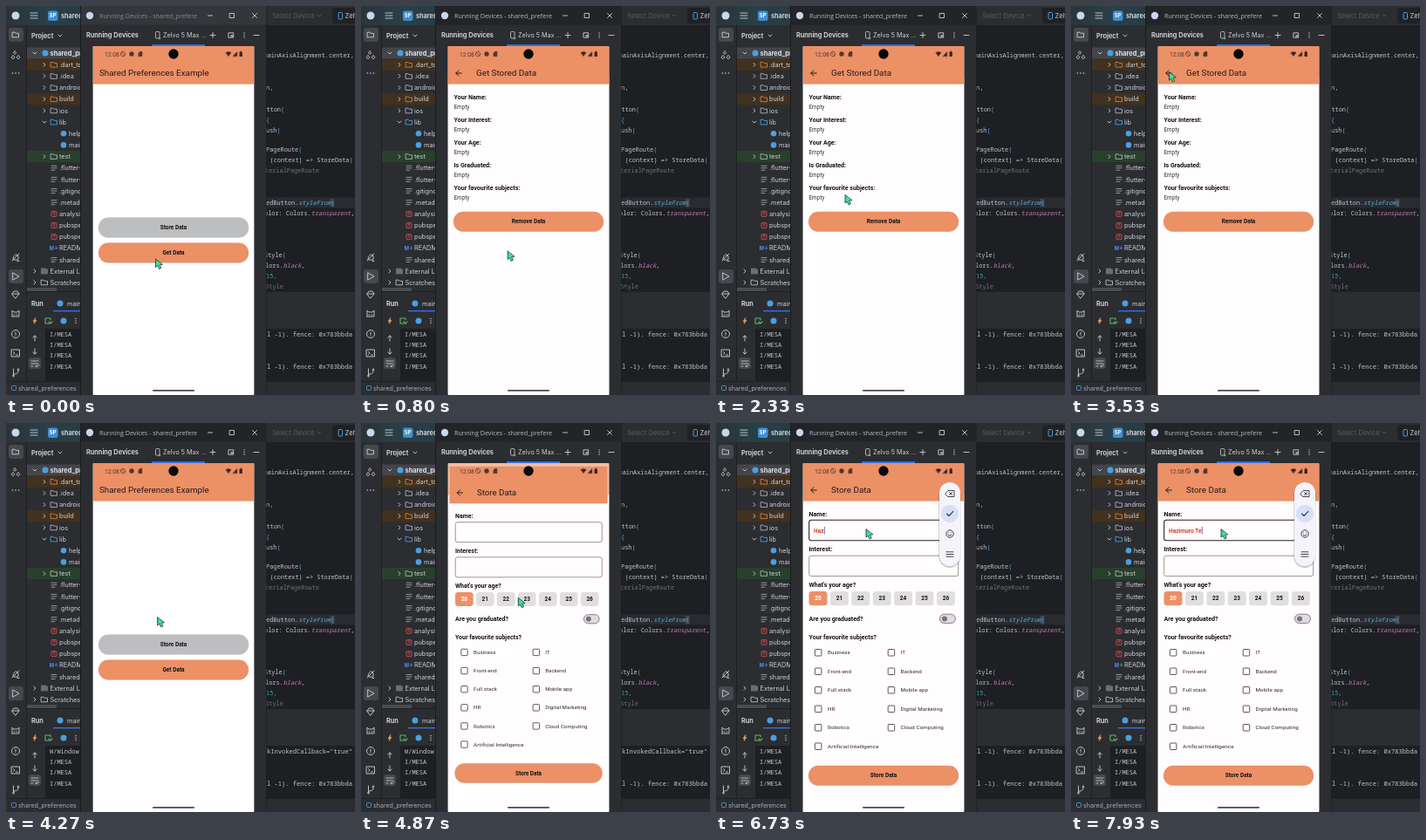
An HTML page for the animation above (8 s loop, 400 by 446 pixels).

```html
<!DOCTYPE html>
<html lang="en">
<head>
<meta charset="utf-8">
<title>Shared Preferences Example</title>
<style>
  html, body { margin: 0; width: 100%; height: 100%; overflow: hidden; background: #1e1f22; }
  svg { display: block; width: 100%; height: 100%; }
  text { white-space: pre; }
</style>
</head>
<body>
<svg id="stage" viewBox="0 0 400 446"></svg>
<script>
const UI = 'Inter, sans-serif', APP = 'Roboto, sans-serif', MONO = 'Noto Sans Mono, monospace';
const ORANGE = '#ec9066', PANEL = '#2b2d30', EDITOR = '#1e1f22', GREY = '#ced0d6', BLUE = '#4a9fe0';
const TYPED = 'Hazimuro Te';

// ---- markup helpers; text is placed by its vertical centre ----
const text = (x, y, str, size, fill, font = UI, more = '') =>
  `<text x="${x}" y="${y + size * 0.36}" font-size="${size}" fill="${fill}" font-family="${font}" ${more}>${str}</text>`;
const rect = (x, y, w, h, fill, r = 0, more = '') =>
  `<rect x="${x}" y="${y}" width="${w}" height="${h}" rx="${r}" fill="${fill}" ${more}/>`;
const dot = (x, y, r, fill, more = '') => `<circle cx="${x}" cy="${y}" r="${r}" fill="${fill}" ${more}/>`;
const line = (x, y, d, color = GREY, width = 0.9, fill = 'none') =>
  `<path transform="translate(${x} ${y})" d="${d}" fill="${fill}" stroke="${color}" stroke-width="${width}" stroke-linecap="round" stroke-linejoin="round"/>`;
const bold = 'font-weight="700"', semi = 'font-weight="600"', middle = 'text-anchor="middle"';
const RIGHT = 'M-1-2L1 0L-1 2', DOWN = 'M-2-1L0 1L2-1';
const FOLDER = 'M-3.5-2.8H-1L.2-1.7H3.5V2.8H-3.5Z';

// ---- IDE ----
function toolStrip() {
  const icons = [
    [55, 'M-3 2a1.7 1.7 0 1 0 .1 0M3 2a1.7 1.7 0 1 0 .1 0M-1-3a1.5 1.5 0 1 0 .1 0'],
    [288, 'M-4 4L4-4M-3 2C-2-4 2-4 3-1V3H-2M2 4.5H4'],
    [331, 'M-4-1L-2-4H2L4-1L0 4ZM-4-1H4'],
    [353, 'M-4 3V-4L-2-2H2L4-4V3H-4M-2 1H-1M1 1H2'],
    [376, 'M0-4.5a4.5 4.5 0 1 0 .1 0M0-2V.8M0 2.3V2.4'],
    [398, 'M-4.5-4H4.5V4H-4.5ZM-2.5-1.5L-1 0L-2.5 1.5M.5 2H2.5'],
    [420, 'M-2.5-4V4M-2.5 2C3 2 3 0 3-2M3-4a1 1 0 1 0 .1 0M-2.5 3a1 1 0 1 0 .1 0']
  ];
  return rect(0, 22, 24, 410, PANEL) + rect(3, 25, 17, 16, '#45484d', 3) + line(11, 33, FOLDER) +
    icons.map(([y, d]) => line(11, y, d)).join('') +
    rect(3, 302, 17, 16, '#45484d', 3) + line(11, 310, 'M-3-4L4 0L-3 4Z') +
    [7.5, 11, 14.5].map(x => dot(x, 77, 0.8, GREY)).join('') + rect(23, 22, 1, 408, EDITOR);
}

function projectTree() {
  // first letter: d folder, o open folder, f plain file, y config, m markdown, b blue file
  const rows = ['d.dart_tool', 'd.idea', 'dandroid', 'dbuild', 'dios', 'olib', 'bhelper', 'bmain.dart', 'dtest',
    'f.flutter-plugins', 'f.flutter-plugins', 'f.gitignore', 'f.metadata', 'yanalysis', 'ypubspec', 'ypubspec',
    'mREADME', 'fshared_pref'];
  const tint = { 0: '#41311f', 3: '#41311f', 8: '#28402c' };
  let out = rect(24, 22, 64, 306, PANEL) + text(29, 34, 'Project', 7.4, '#dfe1e5', UI, semi) + line(62, 34, DOWN) +
    rect(24, 47.5, 64, 13, '#43454a') + line(33, 54, DOWN) + dot(45, 54, 3.5, BLUE) +
    text(50.5, 54, 'shared_pref', 7.4, '#dfe1e5', UI, bold);
  rows.forEach((row, i) => {
    const y = 67.3 + i * 13.16, kind = row[0], x = kind === 'b' ? 66 : 55;
    if (tint[i]) out += rect(24, y - 6.6, 64, 13.2, tint[i]);
    if ('do'.includes(kind)) {
      const color = kind === 'o' ? BLUE : tint[i] && i < 8 ? '#cf8145' : '#aeb1b7';
      out += line(44, y, kind === 'o' ? DOWN : RIGHT) + line(x, y, FOLDER, color, 0.9);
    } else if (kind === 'b') out += dot(x, y, 3.3, BLUE);
    else if (kind === 'y') out += rect(x - 3, y - 3, 6, 6, '#4a2a2e', 1, 'stroke="#d05560" stroke-width=".8"') + text(x, y, 'Y', 4.6, '#e06c75', UI, middle);
    else if (kind === 'm') out += text(x, y, 'M↓', 5.6, '#548af7', UI, `${bold} ${middle}`);
    else out += line(x, y, 'M-3-2.5H3M-3 0H3M-3 2.5H1', '#aeb1b7', 0.8);
    out += text(x + 6, y, row.slice(1), 7.3, GREY);
  });
  return out + line(33, 304, RIGHT) + line(44, 304, 'M-3-3V3M-1-3V3M1-3V3M3-2V3', GREY, 0.8) +
    text(50.5, 304, 'External Libraries', 7.3, GREY) + line(33, 317, RIGHT) +
    line(44, 317, FOLDER, GREY, 0.8) + text(50.5, 317, 'Scratches and', 7.3, GREY) + rect(24, 323, 34, 4, '#4a4c50');
}

function editor() {
  const it = (s, color) => `<tspan fill="${color}" font-style="italic">${s}</tspan>`;
  const dim = '#6f737a', purple = '#c77dbb';
  const code = [
    [295.5, 57, 'mainAxisAlignment.center,'], [298, 94, 'n,'], [286, 118.5, ' button('], [298, 130.5, '{'],
    [298, 142.5, 'ush('], [298, 165, 'PageRoute('], [302.5, 177, '(context) => StoreData('],
    [297, 189, 'terialPageRoute', dim], [298, 226, 'edButton.' + it('styleFrom', '#57b5d8') + '('],
    [296, 238, 'olor: Colors.' + it('transparent', purple) + ','], [296, 286, 'Style('],
    [297, 298, 'lors.' + it('black', purple) + ','], [298, 310, '15,', '#2aacb8'], [293, 322, 'tStyle', dim]
  ];
  const bracket = s => s.replace(/[({]$/, '<tspan fill="#5aa9ee">$&</tspan>');
  return rect(298, 22, 102, 306, EDITOR) + rect(298, 219.5, 102, 12, '#292b31') + rect(371.5, 221, 5, 9.5, '#43454a') +
    code.map(([x, y, s, c = '#c3c5cb']) => text(x, y, bracket(s), 6.9, c, MONO)).join('');
}

function runPanel() {
  return rect(24, 328, 376, 104, PANEL) + rect(24, 327, 376, 1, EDITOR) +
    text(29, 341, 'Run', 7.4, '#dfe1e5', UI, semi) + dot(62, 341, 3.5, BLUE) + text(70, 341, 'main.dart', 7.3, GREY) +
    rect(54, 349, 34, 1.3, '#3574f0') + line(33, 361, 'M.8-3.4L-2 .8H0L-.8 3.4L2-.8H0Z', '#f2a55c', 0.6, '#f2a55c') +
    line(48, 361, 'M3 3H-3V-3H3V-1M1 1L3 3L5 1', '#5fb865', 1.1) + dot(66, 361, 3.5, BLUE) +
    [358.5, 361, 363.5].map(y => dot(80, y, 0.7, GREY)).join('') + rect(45, 370, 355, 60, EDITOR) +
    line(33, 381, 'M0 3V-3M-2.2-1L0-3L2.2-1') + line(33, 396, 'M0-3V3M-2.2 1L0 3L2.2 1') +
    rect(26, 403, 14, 13, '#45484d', 3) + line(33, 410, 'M-4-3H4M-4 0H3C5 0 5 3 3 3H1M2 2L1 3L2 4M-4 3H-2', GREY, 0.8) +
    '<g id="console"></g>' + rect(0, 430, 400, 16, PANEL) + rect(0, 430, 400, 1, EDITOR) +
    rect(6.5, 435.5, 5, 5, 'none', 1, `stroke="${BLUE}" stroke-width=".9"`) + text(14, 438, 'shared_preferences', 7.1, '#a8adbd');
}

function topBar() {
  return rect(0, 0, 400, 22, 'url(#bar)') + rect(0, 22, 400, 1, EDITOR) + dot(11, 11, 4.5, '#c9d6ee') +
    line(32, 11, 'M-4-3H4M-4 0H4M-4 3H4') + rect(48, 5.5, 11.5, 11.5, '#3f8fd0', 2.5) +
    text(53.7, 11.2, 'SP', 6, '#fff', UI, `${bold} ${middle}`) + text(63, 11, 'shared_pref', 7.4, '#dfe1e5', UI, semi) +
    text(305, 11, 'Select Device', 7.5, '#5a5d63') + line(359, 11, DOWN, '#5a5d63') +
    rect(374, 2, 30, 18, '#1f2124', 3) + rect(381, 7.5, 4.5, 7.5, 'none', 1, `stroke="${BLUE}"`) + text(388.5, 11, 'Zelvo 5 Max', 7.4, GREY);
}

function deviceWindow() {
  return rect(85, 0, 213.5, 446, '#1b1c1e') + rect(86, 0, 212, 446, PANEL) + rect(86, 0, 212, 21.5, '#222427', 0, 'id="titleBar"') +
    dot(96, 11, 4.2, '#c9d6ee') + text(107, 11, 'Running Devices - shared_prefere', 7.2, '#b8bac0', 'Open Sans, sans-serif', 'id="windowTitle"') +
    line(234, 11, 'M-2.5 0H2.5') + line(259, 11, 'M-2.5-2.5H2.5V2.5H-2.5Z') + line(285, 11, 'M-2.5-2.5L2.5 2.5M2.5-2.5L-2.5 2.5') +
    text(92, 33.5, 'Running Devices', 7.4, '#dfe1e5', UI, semi) + rect(171.5, 29.5, 4.5, 7.5, 'none', 1, `stroke="${GREY}" stroke-width=".8"`) +
    dot(176, 37, 1.3, '#5fb865') + text(180, 33.5, 'Zelvo 5 Max ...', 7.2, GREY) + rect(167, 44.2, 61, 1.8, '#3574f0') +
    line(237, 33.5, 'M-3 0H3M0-3V3') + line(258, 33.5, 'M-2.7-2.7H2.7V2.7H-2.7ZM.2 .2H1.5V1.5H.2Z') +
    [31, 33.5, 36].map(y => dot(273, y, 0.7, GREY)).join('') + line(287, 33.5, 'M-3 0H3');
}

// ---- phone pages ----
const label = (y, s) => text(106.5, y, s, 7.1, '#161314', APP, bold);
const button = (y, s, fill = ORANGE) =>
  rect(105.8, y - 11.2, 172.4, 23, 'rgba(60,40,80,.22)', 11.5) + rect(106, y - 11.5, 172, 22.7, fill, 11.3) +
  text(192, y - 0.2, s, 6.5, '#161314', APP, `${bold} ${middle}`);
const page = (id, title, body, back = true) =>
  `<g id="${id}">` + rect(99.7, 46, 184.6, 400, back ? '#fffdfe' : '#fff') + rect(99.7, 46, 184.6, 43.6, ORANGE) +
  (back ? line(112, 77, 'M3.2 0H-3.2M0-3.2L-3.2 0L0 3.2', '#241a18', 1) : '') +
  text(back ? 132 : 107, 76.6, title, 9.85, '#241a18', APP) + body + '</g>';

const homePage = () => page('home', 'Shared Preferences Example', button(254, 'Store Data', '#bcbec0') + button(283, 'Get Data'), false);

const storedPage = () => page('stored', 'Get Stored Data',
  ['Name', 'Interest', 'Age', '', 'favourite subjects'].map((s, i) => {
    const y = 104 + i * 26.1;
    return label(y, s ? `Your ${s}:` : 'Is Graduated:') + text(106.5, y + 11.4, 'Empty', 6.3, '#333', APP);
  }).join('') + button(247.3, 'Remove Data'));

function storePage() {
  const subjects = ['Business', 'IT', 'Front-end', 'Backend', 'Full stack', 'Mobile app', 'HR', 'Digital Marketing',
    'Robotics', 'Cloud Computing', 'Artificial Intelligence'];
  const field = (y, id) => rect(106.7, y, 171, 23.4, 'none', 2.5, `id="${id}" stroke="#85797a" stroke-width=".8"`);
  const chips = [...Array(7).keys()].map(i => {
    const x = 106.5 + i * 24.4;
    return rect(x, 193, 21, 16.3, i ? '#e0dee0' : ORANGE, 3.5) +
      text(x + 10.5, 201, 20 + i, 6.5, i ? '#161314' : '#fff', APP, `${bold} ${middle}`);
  }).join('');
  const checks = subjects.map((s, i) => {
    const x = i % 2 ? 197.2 : 113.4, y = 263.2 + (i >> 1) * 21.5;
    return rect(x, y - 3.7, 7.5, 7.5, 'none', 0.8, 'stroke="#4a4548" stroke-width=".9"') +
      text(i % 2 ? 211.5 : 128, y, s, 6.2, '#29252a', APP, 'letter-spacing=".1"');
  }).join('');
  return page('store', 'Store Data', label(104, 'Name:') + field(111.3, 'nameField') +
    '<g id="entry">' + text(112, 123.3, '', 6.6, '#d0452f', APP, `${bold} id="typed"`) +
    rect(0, 119, 0.9, 8.5, '#4a63d0', 0, 'id="caret"') + '</g>' +
    label(144.5, 'Interest:') + field(152.2, 'interestField') + label(185.5, "What's your age?") + chips +
    label(224.4, 'Are you graduated?') + rect(256.5, 219.2, 18, 10.4, '#dedbe2', 5.2, 'stroke="#77727b" stroke-width=".9"') +
    dot(262, 224.4, 3, '#77727b') + label(245, 'Your favourite subjects?') + checks + button(404.3, 'Store Data'));
}

const statusBar = () => text(113, 55.3, '12:08', 6.8, '#54372c', APP) +
  line(134, 55, 'M0-2.7a2.7 2.7 0 1 0 .1 0M-1.8-1.8L1.8 1.8', '#54372c', 0.8) + dot(144, 55, 2.7, '#54372c') +
  line(154, 55, 'M-2-1L-.7-2.7H2V2.7H-2Z', '#54372c', 0.5, '#54372c') + dot(192, 55, 5.7, '#080808') +
  line(255, 55, 'M-3-1.5Q0-3.5 3-1.5L0 2.5Z', '#3b251d', 0.4, '#3b251d') +
  line(262.5, 55, 'M-2.3 2.5L2.3-2.5V2.5Z', '#3b251d', 0.4, '#3b251d') +
  rect(267.5, 52.4, 3.4, 5.6, '#3b251d', 0.6) + rect(268.5, 51.6, 1.4, 1, '#3b251d') + rect(168, 440, 48, 1.7, '#4b494b', 0.8);

const inputBar = () => '<g id="inputBar">' + rect(255.2, 69, 25.2, 97, 'rgba(0,0,0,.2)', 12.5) + rect(256, 68, 24, 96, '#f5f4fa', 12) +
  line(268, 81, 'M-5 0L-2-3.5H5V3.5H-2ZM-.5-1.4L2.5 1.4M2.5-1.4L-.5 1.4', '#2d2e35') + dot(268, 104, 10.2, '#d6e0f9') +
  line(268, 104, 'M-3.5 0L-1 2.5L3.8-2.6', '#2d3b5c', 1.1) +
  line(268, 127, 'M0-4.2a4.2 4.2 0 1 0 .1 0M-1.6-1.2V-1M1.6-1.2V-1M-2 1.3Q0 3.4 2 1.3', '#2d2e35') +
  line(268, 150.5, 'M-4-2.7H4M-4 0H4M-4 2.7H4', '#2d2e35') + '</g>';

document.getElementById('stage').innerHTML =
  `<defs><clipPath id="screen">${rect(99.7, 46, 184.6, 400, '#000', 1)}</clipPath>
   <linearGradient id="bar"><stop stop-color="#2b3438"/><stop offset=".12" stop-color="#284049"/><stop offset=".5" stop-color="${PANEL}"/></linearGradient>
   <linearGradient id="mint" x2="1" y2="1"><stop stop-color="#2fd98a"/><stop offset="1" stop-color="#4cf0cf"/></linearGradient></defs>` +
  rect(0, 0, 400, 446, EDITOR) + topBar() + projectTree() + toolStrip() + editor() + runPanel() + deviceWindow() +
  `<g clip-path="url(#screen)">${rect(99, 46, 186, 400, '#fff')}${homePage()}${storedPage()}${storePage()}${statusBar()}${inputBar()}</g>` +
  `<g id="cursor">${line(0, 0, 'M.5.5V9.6L2.7 7.7L4.6 11.5L6.8 10.4L5 6.8L8 6.4Z', '#16302c', 0.8, 'url(#mint)')}</g>`;

// ---- motion ----
const $ = id => document.getElementById(id);
const clamp = v => Math.max(0, Math.min(1, v));
const phase = (t, start, length) => clamp((t - start) / length);
const settle = p => 1 - (1 - p) ** 4;
const glide = p => p * p * (3 - 2 * p);

// time, x, y of the pointer tip
const route = [[0, 171, 290], [600, 171, 290], [1250, 156, 250], [2050, 156, 250], [3050, 112, 75.5],
  [3750, 112, 75.5], [4450, 185, 251], [4700, 185, 251], [5100, 171.5, 121.5], [8000, 171.5, 121.5]];

function pointer(t) {
  const i = route.findIndex((stop, k) => k && t <= stop[0]);
  const [t0, x0, y0] = route[i - 1], [t1, x1, y1] = route[i];
  const p = glide(phase(t, t0, t1 - t0));
  return `translate(${x0 + (x1 - x0) * p} ${y0 + (y1 - y0) * p})`;
}

function zoom(id, scale, opacity = 1) {
  $(id).setAttribute('transform', `translate(192 246) scale(${scale}) translate(-192 -246)`);
  $(id).setAttribute('opacity', opacity);
}

const logText = (left, top) => [376.5, 388.7, 400.9, 413].map((y, i) =>
  text(50, y, i ? 'I/MESA' : left, 7, '#c3c5cb', MONO) +
  (i % 3 ? '' : text(299, y, i ? 'l -1). fence: 0x783bbda' : top, 7.1, '#c3c5cb', MONO))).join('');
const logs = [logText('I/MESA', 'l -1). fence: 0x783bbda'), logText('W/Window', 'kInvokedCallback="true"')];
let shownLog = -1;

function draw(t) {
  const leaving = phase(t, 3650, 300);
  const stored = settle(phase(t, 150, 400)) * (1 - glide(leaving));
  const store = settle(phase(t, 4705, 400));
  const covered = Math.max(stored, store);
  zoom('home', 1 + 0.05 * covered, 1 - 0.45 * covered);
  zoom('stored', 0.85 + 0.15 * stored, leaving ? 1 - leaving : clamp(stored * 2));
  zoom('store', 0.85 + 0.15 * store, clamp(store * 2));

  // the window gains focus with the first click
  const active = t >= 120;
  $('titleBar').setAttribute('fill', active ? '#222427' : '#33363a');
  $('windowTitle').setAttribute('fill', active ? '#b8bac0' : '#85888e');

  const focused = t >= 6070;
  $('nameField').setAttribute('stroke', focused ? '#262022' : '#85797a');
  $('nameField').setAttribute('stroke-width', focused ? 1.1 : 0.8);
  $('inputBar').setAttribute('opacity', phase(t, 6130, 130));
  $('entry').setAttribute('opacity', focused ? 1 : 0);
  const typed = $('typed');
  typed.textContent = TYPED.slice(0, Math.max(0, Math.floor((t - 6250) / 150)));
  $('caret').setAttribute('x', 112.3 + typed.getComputedTextLength());

  const log = t > 3700 && t < 5050 ? 1 : 0;
  if (log !== shownLog) $('console').innerHTML = logs[shownLog = log];
  $('cursor').setAttribute('transform', pointer(t));
}

const began = performance.now();
function tick() {
  draw((performance.now() - began) % 8000);
  requestAnimationFrame(tick);
}
tick();
</script>
</body>
</html>
```
